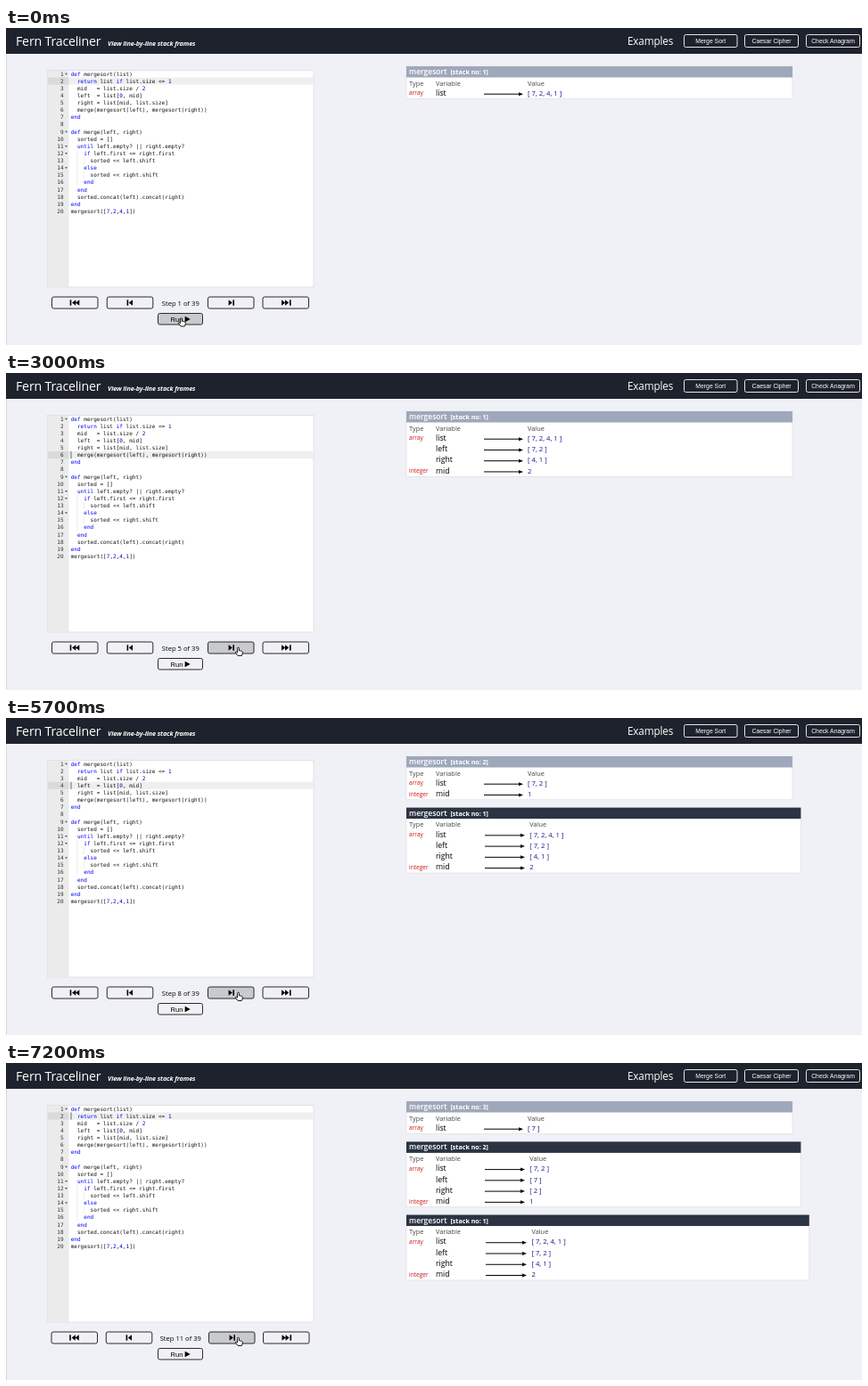
Write an HTML page that moves like this. It is 960 px wide and 356 px high and loops after 7300 ms.

```html
<!DOCTYPE html>
<html lang="en">
<head>
<meta charset="utf-8">
<title>Stack frame viewer</title>
<style>
  html, body { margin: 0; width: 100%; height: 100%; overflow: hidden; background: #f0f1f6; }
  svg { display: block; width: 960px; height: 356px; }
  text { font-family: "Open Sans", "Noto Sans", sans-serif; white-space: pre; }
  .title { font-size: 14.2px; letter-spacing: -.2px; fill: #fff; }
  .sub { font-size: 7.2px; font-weight: 700; font-style: italic; letter-spacing: -.09px; fill: #fff; }
  .examples { font-size: 11.7px; letter-spacing: -.14px; fill: #fff; }
  .btn { font: 6.85px "Liberation Sans", Arial, sans-serif; fill: #fff; text-anchor: middle; }
  .run { font: 7.6px "Liberation Sans", Arial, sans-serif; }
  .step { font-size: 7.6px; text-anchor: middle; }
  .code, .num { font: 6.05px "DejaVu Sans Mono", monospace; fill: #111; }
  .num { fill: #333; text-anchor: end; }
  .key { fill: #00f; }
  .lit { fill: #0000cd; }
  .name { font-size: 8.5px; font-weight: 600; fill: #fff; }
  .no { font-size: 7.1px; font-weight: 700; fill: #fff; }
  .head { font-size: 7.4px; fill: #444; }
  .type { font-size: 6.6px; fill: #d01414; }
  .var { font-size: 8.7px; fill: #000; }
  .val { font-size: 7.7px; fill: #14148c; }
  .ctl { fill: #f1f1f5; stroke: #2b2b2e; }
  .hover { fill: #c9cacd; }
</style>
</head>
<body>
<svg viewBox="0 0 960 356">
  <g id="page"></g>
  <g id="panels"></g>
  <g id="controls"></g>
  <g id="cursor" stroke="#000" stroke-linejoin="round"></g>
</svg>
<script>
const LOOP = 7300;
const TICK = 100;
const LINE = 8.12;
const ROW = 12.25;

const source = `def mergesort(list)
  return list if list.size <= 1
  mid   = list.size / 2
  left  = list[0, mid]
  right = list[mid, list.size]
  merge(mergesort(left), mergesort(right))
end

def merge(left, right)
  sorted = []
  until left.empty? || right.empty?
    if left.first <= right.first
      sorted << left.shift
    else
      sorted << right.shift
    end
  end
  sorted.concat(left).concat(right)
end
mergesort([7,2,4,1])`.split('\n');
const folds = [1, 9, 11, 12, 14];

// Each call lists its variables in display order, newest call first.
const outer = { list: '[ 7, 2, 4, 1 ]' };
const outerMid = { ...outer, mid: '2' };
const outerLeft = { ...outer, left: '[ 7, 2 ]', mid: '2' };
const outerFull = { ...outer, left: '[ 7, 2 ]', right: '[ 4, 1 ]', mid: '2' };
const inner = { list: '[ 7, 2 ]' };
const innerMid = { ...inner, mid: '1' };
const innerLeft = { ...inner, left: '[ 7 ]', mid: '1' };
const innerFull = { ...inner, left: '[ 7 ]', right: '[ 2 ]', mid: '1' };

const steps = [
  { at: 0, line: 2, stack: [outer] },
  { at: 1100, line: 3, stack: [outer] },
  { at: 1800, line: 4, stack: [outerMid] },
  { at: 2300, line: 5, stack: [outerLeft] },
  { at: 2900, line: 6, stack: [outerFull] },
  { at: 3600, line: 2, stack: [inner, outerFull] },
  { at: 4300, line: 3, stack: [inner, outerFull] },
  { at: 5100, line: 4, stack: [innerMid, outerFull] },
  { at: 5900, line: 5, stack: [innerLeft, outerFull] },
  { at: 6500, line: 6, stack: [innerFull, outerFull] },
  { at: 7000, line: 2, stack: [{ list: '[ 7 ]' }, innerFull, outerFull] }
];

const $ = id => document.getElementById(id);
const escape = s => s.replace(/&/g, '&amp;').replace(/</g, '&lt;');
const text = (x, y, cls, s) => `<text x="${x}" y="${y}" class="${cls}">${s}</text>`;
const rect = (x, y, w, h, attrs) =>
  `<rect x="${x}" y="${y}" width="${w}" height="${h}" ${attrs}/>`;
const path = (d, attrs = '') => `<path d="${d}" ${attrs}/>`;

const paint = s => escape(s)
  .replace(/\b(def|return|if|until|else|end)\b|\b\d+\b/g,
    (m, key) => `<tspan class="${key ? 'key' : 'lit'}">${m}</tspan>`);

function header() {
  const button = (x, w, label) =>
    rect(x, 7.5, w, 14, 'rx="2" fill="none" stroke="#e4e5e8"') +
    text(x + w / 2, 17, 'btn', label);
  return rect(0, 0, 960, 29, 'fill="#1e222c"') +
    text(11, 19.5, 'title', 'Fern Traceliner') +
    text(114, 19.6, 'sub', 'View line-by-line stack frames') +
    text(697, 18.6, 'examples', 'Examples') +
    button(760.5, 59.5, 'Merge Sort') +
    button(828.5, 60, 'Caesar Cipher') +
    button(897.5, 60, 'Check Anagram');
}

function editor(step, shown) {
  const top = 47.4 + (step.line - 1) * LINE;
  const guide = (col, line) => {
    const x = 72.7 + col * 3.64, y = 47.4 + (line - 1) * LINE;
    return path(`M${x} ${y}v${LINE}`, 'stroke="#d8d8d8" stroke-width=".5"');
  };
  let out = rect(46.5, 47.5, 298.5, 243.5, 'fill="#fff" stroke="#dcdde1" stroke-width=".8"') +
    rect(47, 48, 23.5, 243, 'fill="#ebebeb"') +
    rect(47, top, 23.5, LINE, 'fill="#dadada"') +
    rect(70.5, top, 274, LINE, 'fill="#efeff0"');
  for (const line of [12, 13, 14, 15, 16]) out += guide(2, line);
  for (const line of [13, 15]) out += guide(4, line);
  source.forEach((s, i) => {
    const y = 53.6 + i * LINE;
    out += text(64.6, y, 'num', i + 1) + text(72.7, y, 'code', paint(s));
    if (folds.includes(i + 1)) out += path(`M66 ${y - 2.8}h3l-1.5 1.9z`, 'fill="#555"');
  });
  if (shown > 1) out += path(`M73 ${top}v${LINE}`, 'stroke="#333" stroke-width=".7"');
  return out;
}

function panel(vars, top, depth, no) {
  const names = Object.keys(vars);
  const width = 433 + 9.4 * depth;
  const height = 36.6 + ROW * (names.length - 1);
  const valueX = 585 + 2.2 * depth;
  const from = 536 + depth, to = 580 + 2 * depth;
  let out = rect(449, top, width, height, 'fill="#fff" stroke="#dcdee4" stroke-width=".7"') +
    rect(449, top, width, 12.5, `fill="${depth ? '#2c3443' : '#9fa8ba'}"`) +
    text(452, top + 9, 'name', 'mergesort') +
    text(498.5, top + 9, 'no', `[stack no: ${no}]`) +
    text(452, top + 21.6, 'head', 'Type') +
    text(482, top + 21.6, 'head', 'Variable') +
    text(valueX, top + 21.6, 'head', 'Value');
  names.forEach((name, i) => {
    const y = top + 32.9 + ROW * i;
    const type = { list: 'array', mid: 'integer' }[name];
    if (type) out += text(452, y - .5, 'type', type);
    out += text(482, y, 'var', name) +
      path(`M${from} ${y - 1.7}H${to - 3}`, 'stroke="#000" stroke-width="1"') +
      path(`M${to} ${y - 1.7}l-5-2v4z`) +
      text(valueX, y, 'val', vars[name]);
  });
  return { out, height };
}

function stackPanels(stack) {
  let top = 43, out = '';
  stack.forEach((vars, i) => {
    const p = panel(vars, top, i, stack.length - i);
    out += p.out;
    top += p.height + 8.8;
  });
  return out;
}

const box = (x, y, w, h, hover) =>
  rect(x, y, w, h, `rx="2" class="ctl${hover ? ' hover' : ''}"`);

// Skip icon: triangles pointing in dir, ending at a bar.
function skip(cx, dir, count) {
  const half = count * 2.1 + .7;
  let d = '';
  for (let i = 0; i < count; i++)
    d += `M${cx + dir * (i * 4 - half)} 305.3v6.4l${dir * 4.2}-3.2z`;
  return path(d) + rect(cx + dir * half - .8, 305.3, 1.6, 6.4, '');
}

function controls(shown, over) {
  const push = shown > 9 ? 1 : 0;
  const button = (x, dir, count, hover) =>
    box(x, 302, 51.5, 13, hover) + skip(x + 25.9, dir, count);
  return button(51.5 - push / 2, -1, 2) +
    button(113.3 - push, -1, 1) +
    button(226.5 + push, 1, 1, over === 'next') +
    button(288 + push / 2, 1, 2) +
    text(195.8, 311.6, 'step', `Step ${shown} of 39`) +
    box(170.5, 320.5, 50, 12.5, over === 'run') +
    text(184.5, 329.8, 'run', 'Run') +
    path('M200.7 323.7v6.6l6-3.3z');
}

const hand = path('M-.9 .8Q-.9-.3 0-.3T.9 .8V3.3l1.1.1 1.2.3 1.1.5q.7.4.6 1.2L4.4 7.6 3.8 9H-.4L-3 5.8q-.6-1 .4-1.2.7 0 1.7 1z',
  'fill="#fff" stroke-width=".9"');
const arrow = path('M0 0v9l2.1-1.9 1.4 3.1 1.4-.6-1.4-3h2.9z', 'fill="#000" stroke="#fff" stroke-width=".6"');

function pointer(t) {
  const p = Math.min(1, Math.max(0, (t - 100) / 600));
  const e = p * p * (3 - 2 * p);
  const x = 196.5 + 64 * e, y = 326 - 17.5 * e;
  const over = y > 320 && x < 221 ? 'run' : x > 226 && y < 315.5 ? 'next' : '';
  return { x, y, over };
}

let last = -1;
function frame() {
  const t = Math.floor(performance.now() % LOOP / TICK) * TICK;
  if (t !== last) {
    last = t;
    const shown = steps.filter(s => s.at <= t).length;
    const step = steps[shown - 1];
    const { x, y, over } = pointer(t);
    $('page').innerHTML = header() + editor(step, shown) +
      path('M.3 29V356', 'stroke="#b9bbc2" stroke-width=".6"');
    $('panels').innerHTML = stackPanels(step.stack);
    $('controls').innerHTML = controls(shown, over);
    $('cursor').innerHTML = over ? hand : arrow;
    $('cursor').setAttribute('transform', `translate(${x} ${y})`);
  }
  requestAnimationFrame(frame);
}
frame();
</script>
</body>
</html>
```
